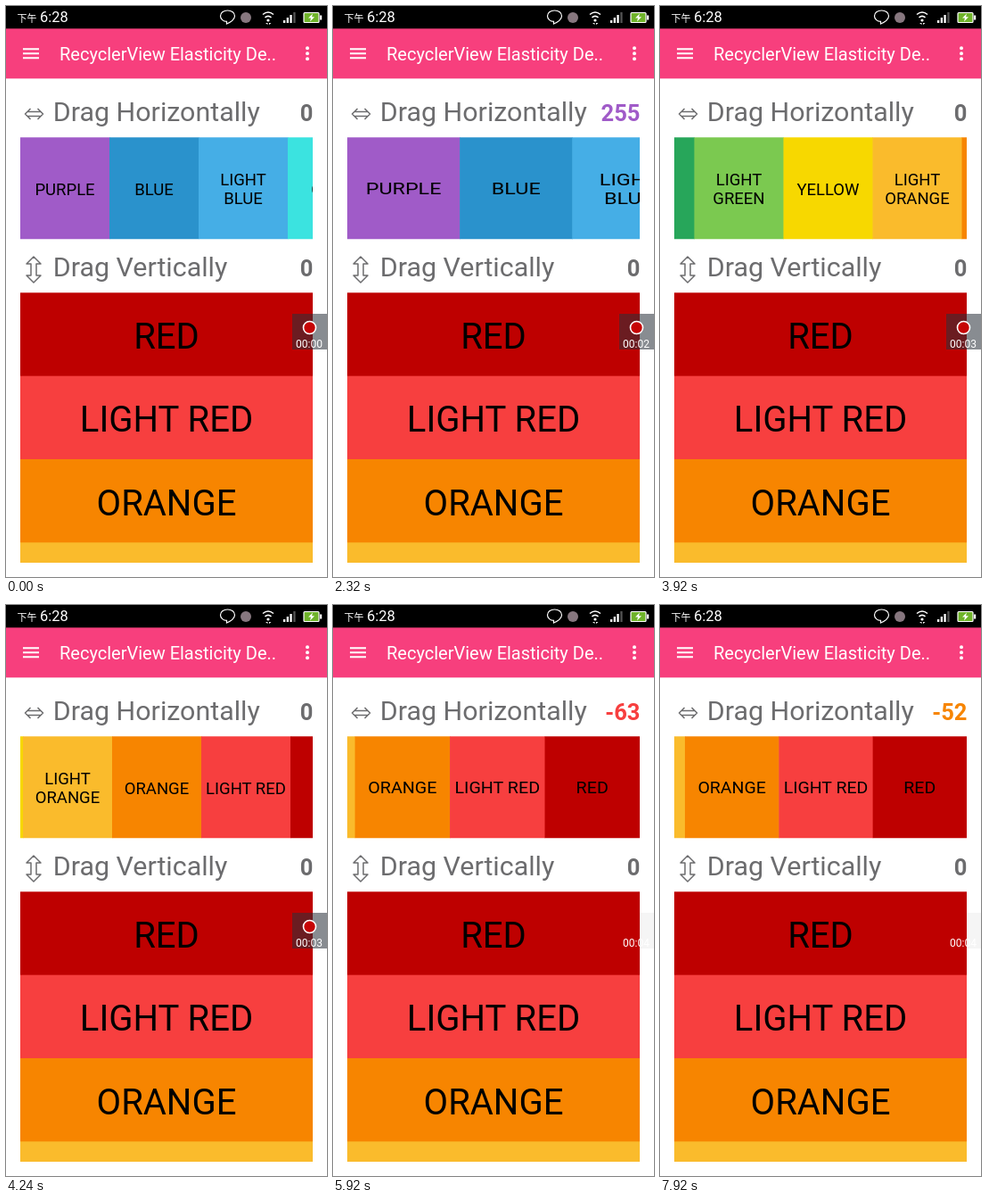
Recreate the animation shown at these times as an HTML page. Size 360 px wide and 640 px high, loop 8 s.

```html
<!DOCTYPE html>
<html lang="en">
<head>
<meta charset="utf-8">
<title>Elastic list</title>
<style>
  html, body { margin: 0; width: 100%; height: 100%; overflow: hidden; background: #fff; }
  svg { display: block; width: 100vw; height: 100vh; font-family: Roboto, "Noto Sans", sans-serif; }
  .head { font-size: 30.4px; fill: #6c6c6e; }
  .value { font-size: 25.5px; font-weight: 700; text-anchor: end; fill: #6c6c6e; }
  .small { font-size: 18.5px; text-anchor: middle; }
  .big { font-size: 40px; text-anchor: middle; }
  .icon { fill: none; stroke: #6c6c6e; stroke-width: 1.5; stroke-linejoin: round; }
</style>
</head>
<body>
<svg viewBox="0 0 360 640" preserveAspectRatio="none">
  <defs>
    <clipPath id="window"><rect x="16" y="147.33" width="328" height="114"/></clipPath>
  </defs>
  <rect width="360" height="640" fill="#fff"/>

  <rect y="25" width="360" height="56.33" fill="#f73f7d"/>
  <rect width="360" height="25.33" fill="#000"/>
  <g fill="#fff">
    <text x="12.5" y="17.5" font-size="11" font-family="'Noto Sans CJK SC', 'Noto Sans CJK', sans-serif">下午</text>
    <text x="38" y="18" font-size="16.4">6:28</text>
    <path d="M248.500 5c-4.700 0-8 2.700-8 6.200s3.300 6.200 7 6.200v2.600c4.500-2 9-5 9-8.800c0-3.500-3.300-6.200-8-6.200z" fill="none" stroke="#fff" stroke-width="1.2"/>
    <circle cx="269" cy="13" r="6" fill="#87777f"/>
    <path d="M288 9.500q6-5 12 0M290.500 12.800q3.500-3 7 0" fill="none" stroke="#fff" stroke-width="1.600"/>
    <circle cx="294" cy="16" r="1.600"/>
    <path d="M291 19h2.500v2zM295 19h2.500l-2.500 2z"/>
    <path d="M311 16h2.300v3h-2.300zM314.700 13h2.300v6h-2.300zM318.400 10h2.300v9h-2.300z"/>
    <path d="M322.300 7h2.300v12h-2.300z" fill="#555"/>
    <rect x="334" y="7.500" width="17" height="11" rx="1" fill="#6fb32a" stroke="#fff" stroke-width="1.200"/>
    <rect x="352" y="10.500" width="2.200" height="5"/>
    <path d="M344 8.500l-5 5h3l-1 4l5-5.300h-3z"/>
  </g>

  <g fill="#fff">
    <path d="M19 47.330h18v2h-18zM19 52.330h18v2h-18zM19 57.330h18v2h-18z"/>
    <text x="60" y="60.500" font-size="20">RecyclerView Elasticity De..</text>
    <circle cx="338" cy="47.330" r="2"/><circle cx="338" cy="53.330" r="2"/><circle cx="338" cy="59.330" r="2"/>
  </g>

  <path class="icon" d="M27.500 115l-6 6l6 6M35.500 115l6 6l-6 6M24.500 118.500h14M24.500 123.500h14"/>
  <text class="head" x="52.800" y="129">Drag Horizontally</text>
  <text class="value" id="pull" x="344.500" y="129">0</text>

  <path class="icon" d="M31 281l8 8h-5v13h5l-8 8l-8-8h5v-13h-5z"/>
  <text class="head" x="52.800" y="303">Drag Vertically</text>
  <text class="value" x="344.500" y="303">0</text>

  <g clip-path="url(#window)"><g id="row"></g></g>
  <g id="column"></g>

  <rect x="344" y="345" width="16" height="40" fill="#f5f5f5" id="trace"/>
  <g id="recorder">
    <rect x="321" y="345" width="39" height="40" fill="#2c323c" fill-opacity=".56"/>
    <circle cx="340.500" cy="360.500" r="7" fill="#c60505" stroke="#fff" stroke-width="1.600"/>
  </g>
  <text id="clock" x="340" y="383" font-size="12" text-anchor="middle" fill="#fff">00:00</text>
</svg>
<script>
const LOOP = 8000, STEP = 80;
const LEFT = 16, RIGHT = 344, CELL = 100;
const COLUMN_TOP = 321.33, COLUMN_END = 624, ROW_H = 93.33;
const GREY = '#6c6c6e', PURPLE = '#a05bc8', BLUE = '#2a92cc', ORANGE = '#f78500';
const LIGHT_RED = '#f73f3f', RED = '#be0000';
const colors = [
  ['PURPLE', PURPLE], ['BLUE', BLUE], ['LIGHT BLUE', '#45aee6'], ['CYAN', '#3be3e0'],
  ['GREEN', '#27a65a'], ['LIGHT GREEN', '#7bc950'], ['YELLOW', '#f7d800'],
  ['LIGHT ORANGE', '#fabb2c'], ['ORANGE', ORANGE], ['LIGHT RED', LIGHT_RED], ['RED', RED]
];
const SCROLL_END = colors.length * CELL - (RIGHT - LEFT);

const $ = id => document.getElementById(id);
const clamp = p => Math.max(0, Math.min(1, p));
const easeOut = (p, power) => 1 - (1 - clamp(p)) ** power;

function add(parent, tag, attrs, text) {
  const node = document.createElementNS('http://www.w3.org/2000/svg', tag);
  for (const key in attrs) node.setAttribute(key, attrs[key]);
  if (text) node.textContent = text;
  parent.appendChild(node);
}

colors.forEach(([name, fill], i) => {
  const x = i * CELL;
  add($('row'), 'rect', { x, y: 147, width: CELL + 0.5, height: 115, fill });
  // Labels of ten letters or more break into two lines
  const lines = name.length > 9 ? name.split(' ') : [name];
  lines.forEach((line, k) => add($('row'), 'text', {
    class: 'small', x: x + CELL / 2, y: 211.5 + (k - (lines.length - 1) / 2) * 20.6
  }, line));
});

colors.slice(-4).reverse().forEach(([name, fill], i) => {
  const y = COLUMN_TOP + i * ROW_H;
  add($('column'), 'rect', { x: LEFT, y, width: RIGHT - LEFT, height: Math.min(ROW_H + 1, COLUMN_END - y), fill });
  if (i < 3) add($('column'), 'text', { class: 'big', x: 180, y: y + 62.8 }, name);
});

const drags = [
  { start: 40, release: 2560, settle: 840, peak: 259, held: PURPLE, back: BLUE },
  { start: 5510, release: 7540, settle: 800, peak: -189.6, held: LIGHT_RED, back: ORANGE }
];

// Overscroll distance and the colour of its label
function pullAt(t) {
  const d = t < drags[1].start ? drags[0] : drags[1];
  const bouncing = t > d.release;
  const share = bouncing
    ? 1 - easeOut((t - d.release) / d.settle, 2)
    : easeOut((t - d.start) / (d.release - d.start), 1.8);
  const amount = Math.round(d.peak * share);
  return { amount, color: amount ? (bouncing ? d.back : d.held) : GREY };
}

function draw(t) {
  const { amount, color } = pullAt(t);
  $('pull').textContent = String(amount || 0);
  $('pull').style.fill = color;

  const scroll = SCROLL_END * easeOut((t - 3520) / 1046, 2);
  const stretch = 1 + Math.abs(amount) / 975;
  const anchor = amount < 0 ? RIGHT : LEFT;
  const x = anchor + (LEFT - scroll - anchor) * stretch;
  $('row').setAttribute('transform', `translate(${x.toFixed(2)} 0) scale(${stretch.toFixed(4)} 1)`);

  const fade = clamp((t - 4440) / 120);
  $('recorder').setAttribute('opacity', 1 - fade);
  $('trace').setAttribute('opacity', fade);
  $('clock').textContent = '00:0' + Math.min(4, Math.floor(t / 1080));
}

const origin = performance.now();
function frame() {
  const t = (performance.now() - origin) % LOOP;
  draw(Math.floor(t / STEP) * STEP);
  requestAnimationFrame(frame);
}
frame();
</script>
</body>
</html>
```
